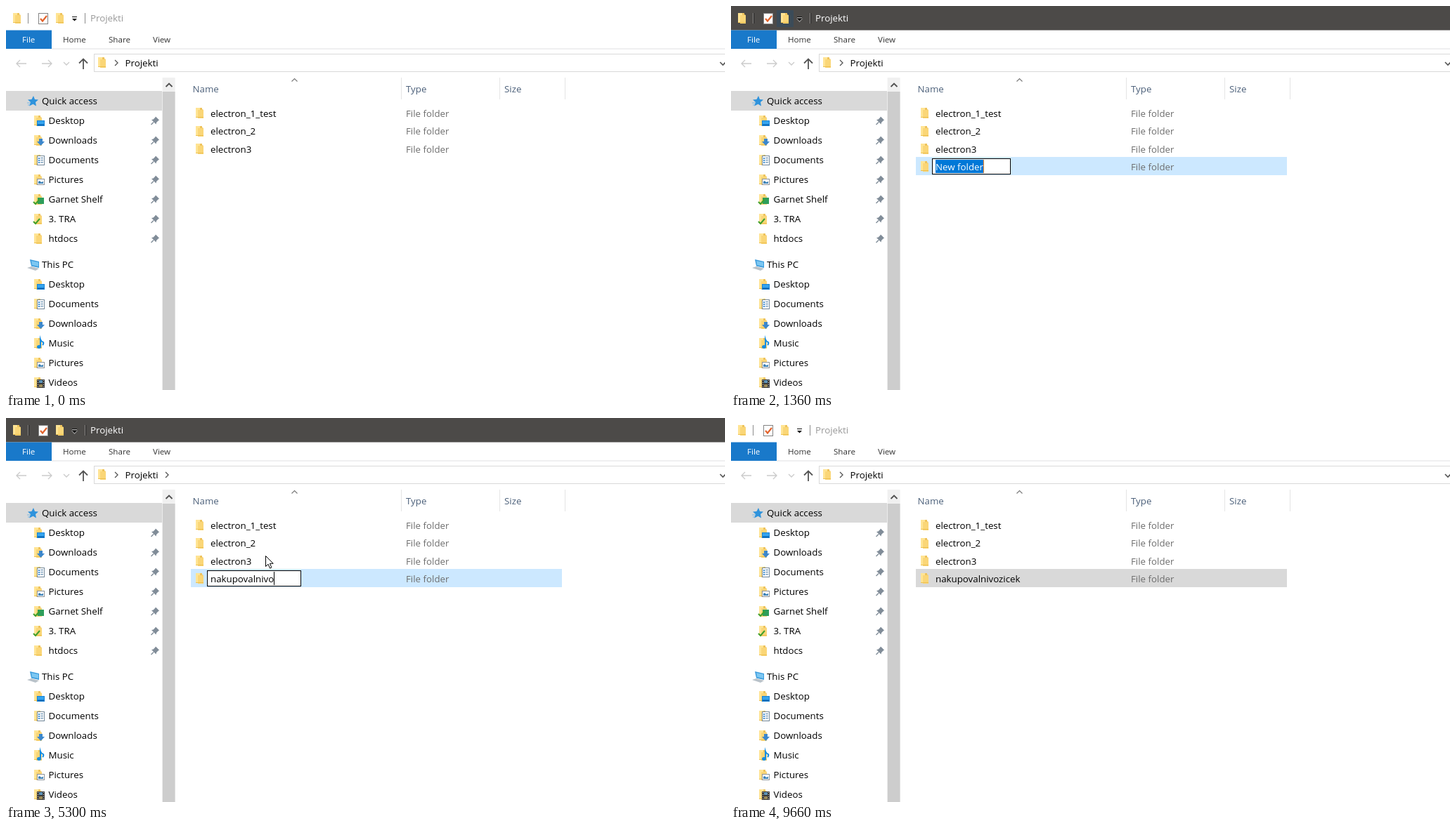
An HTML page with a canvas that plays this animation: 1023 by 547 pixels, repeating every 9.72 s.

```html
<!DOCTYPE html>
<html lang="en">
<head>
<meta charset="utf-8">
<title>Projekti</title>
<style>
html, body { margin: 0; width: 100%; height: 100%; overflow: hidden; background: #fff; }
canvas { display: block; }
</style>
</head>
<body>
<canvas id="stage" width="1023" height="547"></canvas>
<script>
const ctx = document.getElementById('stage').getContext('2d');
const LOOP = 9720, STEP = 20, BLINK = 320;
const NAME_X = 291, SIZE = 13.3;

// [time, letter, pointer blinks out for one step]
const KEYS = [
  [2740, 'n', 1], [2860, 'a', 1], [3000, 'k', 1], [3120, 'u', 1], [3340, 'p', 1],
  [3460, 'o'], [3860, 'v'], [4120, 'a', 1], [4260, 'l'], [4420, 'n'], [4560, 'i'],
  [5160, 'v', 1], [5300, 'o'], [6300, 'z', 1], [6840, 'i', 1], [7140, 'c'],
  [7300, 'e', 1], [7400, 'k', 1]
];
const FILES = ['electron_1_test', 'electron_2', 'electron3'];
const NAV = [
  ['Desktop', 'desktop'], ['Downloads', 'down'], ['Documents', 'page'], ['Pictures', 'picture'],
  ['Garnet Shelf', 'shelf'], ['3. TRA', 'check'], ['htdocs', ''],
  ['Desktop', 'desktop'], ['Documents', 'page'], ['Downloads', 'down'],
  ['Music', 'note'], ['Pictures', 'picture'], ['Videos', 'film']
];
const navY = i => i < 7 ? 163.5 + 28 * i : 396.5 + 28 * (i - 7);
const fileY = i => 153.3 + 25.2 * i;

function rect(x, y, w, h, color) {
  ctx.fillStyle = color;
  ctx.fillRect(x, y, w, h);
}
function frame(x, y, w, h, color) {
  ctx.strokeStyle = color;
  ctx.lineWidth = 1;
  ctx.strokeRect(x + .5, y + .5, w - 1, h - 1);
}
function fill(d, color) {
  ctx.fillStyle = color;
  ctx.fill(new Path2D(d));
}
function stroke(d, color, width = 1.3) {
  ctx.strokeStyle = color;
  ctx.lineWidth = width;
  ctx.stroke(new Path2D(d));
}
function setFont(size) {
  ctx.font = size + 'px "Open Sans", "Noto Sans", sans-serif';
}
function text(s, x, y, color = '#000', size = SIZE) {
  setFont(size);
  ctx.fillStyle = color;
  ctx.fillText(s, x, Math.round(y + size * .375));
}
function at(x, y, draw) {
  ctx.save();
  ctx.translate(x, y);
  draw();
  ctx.restore();
}

function folder(x, y) {
  at(x, y, () => {
    fill('M0 0H9V2L11 3V14H3L0 13Z', '#eec35c');
    fill('M0 0H6V13H0Z', '#ffe494');
    fill('M3 3H11V15H3Z', '#fad677');
    rect(0, 13, 11, 1, '#ecc052');
  });
}

const check = () => stroke('M-1 11L2 14L8 7', '#3fa02c', 2);
const badges = {
  desktop() { rect(4, 7, 11, 8, '#1683d8'); rect(5, 8, 9, 4, '#35a4ee'); rect(5, 13, 9, 1, '#0c5fa5'); },
  down() { fill('M7 5H12V9H15L9.5 15L4 9H7Z', '#3c87cc'); },
  page() {
    rect(4, 1, 11, 14, '#fff');
    frame(4, 1, 11, 14, '#75899a');
    for (let y = 4; y < 13; y += 3) { rect(6, y, 2, 2, '#3c8cd0'); rect(9, y, 4, 1, '#5482a8'); }
  },
  picture() {
    rect(4, 6, 11, 9, '#fff');
    frame(4, 6, 11, 9, '#8b9299');
    fill('M6 13V10L8 9L10 11L13 10V13Z', '#4084b8');
  },
  shelf() { rect(5, 5, 9, 9, '#2e9e5b'); check(); },
  check,
  note() {
    stroke('M9 13V2Q10 5 13 6Q14 8 12 10', '#168de2', 2);
    fill('M4 12.5a3 2.5 0 1 0 6 0a3 2.5 0 1 0 -6 0', '#168de2');
  },
  film() {
    rect(4, 3, 11, 12, '#383838');
    rect(7, 4, 5, 4, '#5c91b5');
    rect(7, 10, 5, 4, '#9b8a58');
    for (let y = 4; y < 14; y += 3) { rect(5, y, 1, 1, '#ddd'); rect(13, y, 1, 1, '#ddd'); }
  }
};

function pin(x, y) {
  at(x, y, () => {
    fill('M1 -6L6 -1L4.5 0L2 2.5L1.5 5L-5 -1.5L-2.5 -2L0 -4.5Z', '#808c98');
    stroke('M-2 2L-5.5 5.5', '#808c98', 1.4);
  });
}

function titleBar(dark, hot) {
  if (dark) rect(0, 0, 1023, 34.5, '#4c4a48');
  if (hot) rect(65, 6, 24, 24, dark ? '#3b4b58' : '#cce8ff');
  folder(10, 10);
  const sep = dark ? '#8a8886' : '#8c8c8c';
  rect(31, 10, 1, 15, sep);
  rect(112, 10, 1, 15, sep);
  if (dark) { rect(32, 10, 1, 15, '#222'); rect(113, 10, 1, 15, '#222'); }
  rect(46, 10, 14, 16, '#fff');
  frame(46, 10, 14, 16, '#838383');
  stroke('M49 18L52 21.5L58 14', '#e3622b', 2.2);
  folder(71, 10);
  if (dark) {
    rect(94, 16, 7, 1, '#aaa');
    fill('M93 18H102L97.5 23Z', '#aaa');
  }
  rect(94, 15, 7, 1, '#111');
  fill('M94 18H101L97.5 21.5Z', '#111');
  text('Projekti', 120, 17.5, dark ? '#fff' : '#999');
}

function toolbar(secondChevron) {
  rect(0, 34.5, 65, 26.5, '#1979ca');
  text('File', 23, 48, '#fff', 11.6);
  text('Home', 81, 48, '#333', 11.6);
  text('Share', 146, 48, '#333', 11.6);
  text('View', 209, 48, '#333', 11.6);
  rect(65, 60.5, 958, 1, '#dfe0e1');
  stroke('M29 82H15M20 77L15 82L20 87M51 82H65M60 77L65 82L60 87M82 80L86 84L90 80', '#cbcbcb');
  stroke('M110 90V76M104 81.5L110 75.5L116 81.5', '#555', 1.8);
  frame(125, 68, 910, 26, '#d9d9d9');
  folder(131, 73);
  stroke('M155 77L159 81L155 85', '#555');
  text('Projekti', 169.5, 81);
  if (secondChevron) stroke('M227 77L231 81L227 85', '#555');
  stroke('M1016 80L1020 84L1024 80', '#555', 1.6);
}

function sidebar(hover) {
  rect(0, 121, 222, 28, '#d9d9d9');
  fill('M39 128L41 133L46 133.4L42 137L43 142.5L38.5 139.7L33 142.5L35 137L31 133.4L36.5 133Z', '#2f93dc');
  stroke('M30 138H35M31 141H34', '#7db9e6', 1);
  text('Quick access', 51, 135.5);
  fill('M34 361L47 364V373L36 370.5Z', '#3a9bdc');
  fill('M36 363L46 365V371L37 369Z', '#7cc7f2');
  fill('M30 373L36 371L47 374L42 377Z', '#b9c2c9');
  text('This PC', 51, 368.5);
  NAV.forEach(([label, badge], i) => {
    const y = navY(i);
    if (i === hover) rect(0, Math.round(y - 14.5), 222, 28, '#e5f3ff');
    at(40, Math.round(y - 8), () => {
      folder(0, 0);
      if (badge) badges[badge]();
    });
    text(label, 60.5, y);
    if (i < 7) pin(212, y);
  });
  rect(222.6, 102, 18, 20, '#f0f0f0');
  rect(222.6, 122, 18, 425, '#cdcdcd');
  stroke('M227.5 115L232 110.5L236.5 115', '#505050', 1.8);
}

function fileRow(name, i) {
  const y = fileY(i);
  folder(270, Math.round(y - 8));
  text(name, NAME_X, y);
  text('File folder', 569, y, '#6d6d6d');
}

function list(hover) {
  text('Name', 265.5, 118, '#4c607a');
  text('Type', 569, 118, '#4c607a');
  text('Size', 709, 118, '#4c607a');
  for (const x of [562, 702, 795]) rect(x, 102, 1, 31, '#e5e5e5');
  stroke('M406.5 107.5L410.5 103.5L414.5 107.5', '#777', 1.1);
  if (hover >= 0) rect(263, Math.round(fileY(hover) - 13), 528, 26, '#e5f3ff');
  FILES.forEach(fileRow);
}

function newRow(t) {
  const active = t < 9660, done = t >= 7740;
  rect(263, 215, 528, 26, active ? '#cce8ff' : '#d9d9d9');
  if (done && active) frame(263, 215, 528, 26, '#99d1ff');
  const typed = KEYS.filter(k => k[0] <= t);
  const word = typed.map(k => k[1]).join('');
  fileRow(done ? word : '', 3);
  if (done || t < 1320) {
    if (!done) text('New folder', NAME_X, fileY(3));
    return;
  }
  const name = word || 'New folder';
  setFont(SIZE);
  const end = Math.round(NAME_X + ctx.measureText(name).width);
  rect(286, 217, end + 39 - 286, 23, '#fff');
  frame(286, 217, end + 39 - 286, 23, '#000');
  if (!word) rect(NAME_X, 219, end - NAME_X, 19, '#0078d7');
  text(name, NAME_X, fileY(3), word ? '#000' : '#fff');
  const since = word ? typed[typed.length - 1][0] : 1740;
  if (Math.floor((t - since) / BLINK) % 2 === 0) rect(end, 219, 1, 19, word ? '#000' : '#ff8728');
}

function pointer(t) {
  if (t >= 320 && t < 720) {
    const d = 620 - t;
    return [386 + d * 2.12, 135 + d * (d > 0 ? 1.217 : 1.55)];
  }
  if (t >= 1500 && t < 8440) {
    if (KEYS.some(([at, , blink]) => blink && t >= at && t < at + STEP)) return null;
    const p = Math.min(1, (t - 1500) / 380), q = 1 - p;
    return [77 + 293 * p * (2 - p), 18 * q * q + 2 * p * q * 586 + 197 * p * p];
  }
  return t >= 8440 && t < 8460 ? [369, 183] : null;
}

function arrow(x, y) {
  at(Math.round(x) - .5, Math.round(y) - .5, () => {
    const d = 'M0 0V15L3.5 11.7L6 17.5L8.4 16.4L5.9 10.8H10.7Z';
    fill(d, '#fff');
    stroke(d, '#000', 1);
  });
}

// The row highlight trails the pointer by two steps.
function fileHover(t) {
  const p = t < 720 && pointer(t - 2 * STEP);
  if (!p || p[0] < 263 || p[0] > 791) return -1;
  return FILES.findIndex((_, i) => Math.abs(p[1] - fileY(i)) < 12.6);
}
function navHover(t) {
  if (t < 8960 || t >= 9240) return -1;
  const d = (t - 9100) / 140;
  const y = 155 + (d < 0 ? 325 : 500) * d * d;
  return NAV.findIndex((_, i) => Math.abs(y - navY(i)) <= 14);
}

function draw(t) {
  rect(0, 0, 1023, 547, '#fff');
  titleBar(t >= 1220 && t < 9640, t >= 1080 && t < 1520);
  toolbar(t >= 1500 && t < 9660);
  sidebar(navHover(t));
  list(fileHover(t));
  if (t >= 1280) newRow(t);
  const p = pointer(t);
  if (p) arrow(...p);
}

const start = performance.now();
function tick() {
  const t = (performance.now() - start) % LOOP;
  draw(Math.floor(t / STEP) * STEP);
  requestAnimationFrame(tick);
}
tick();
</script>
</body>
</html>
```
